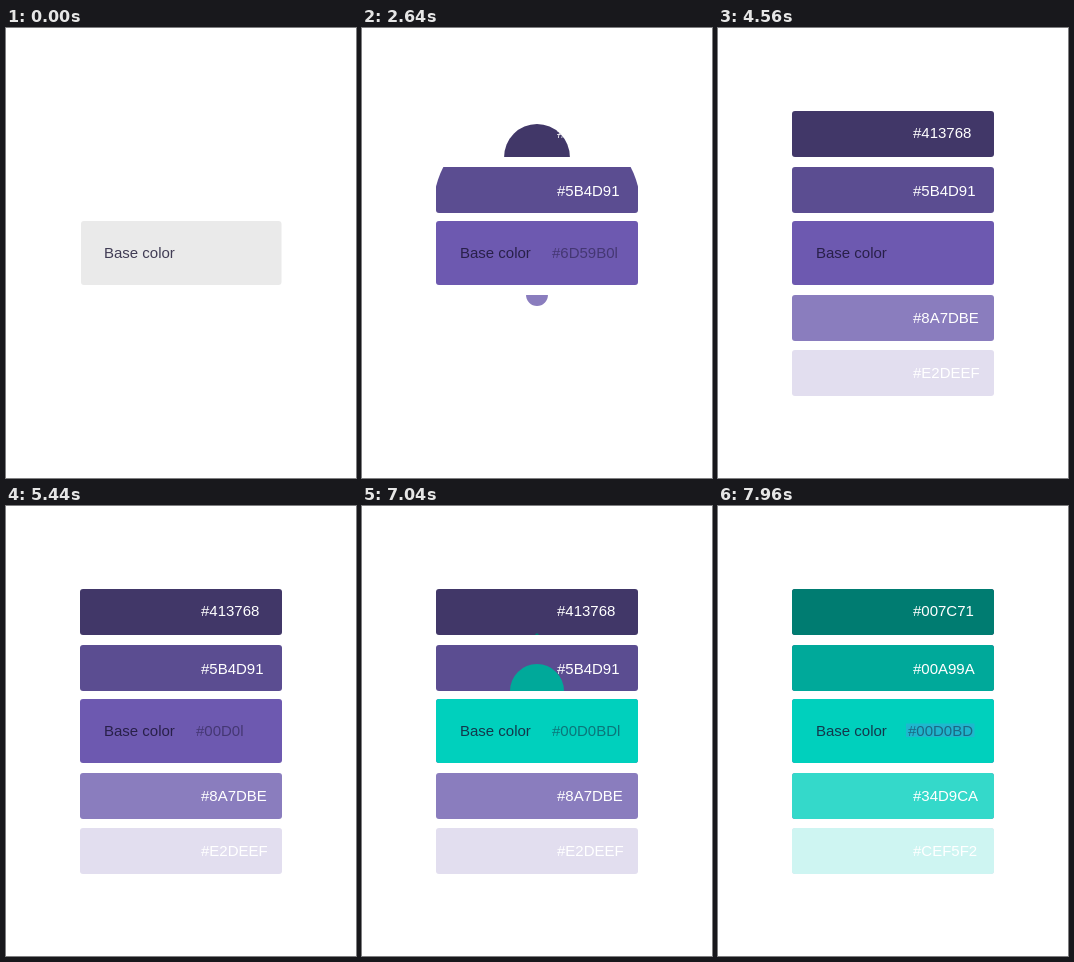
An HTML page that plays this animation: 350x450 px, repeating every 8 s.

```html
<!DOCTYPE html>
<html lang="en">
<head>
<meta charset="utf-8">
<title>Base color palette</title>
<style>
  html, body { margin: 0; width: 100%; height: 100%; overflow: hidden; background: #fff; }
  svg { display: block; width: 350px; height: 450px; }
  text { font: 15px "Liberation Sans", Arial, sans-serif; white-space: pre; }
</style>
</head>
<body>
<svg id="stage" viewBox="0 0 350 450"></svg>
<script>
const LOOP = 8000, STEP = 40, SECOND = 4640, CLEARED = 4080;
const GROW = 460, FULL = 112, KEY = 160, INK = '#181230';

// Each bar is revealed by a circle growing around (175, cy).
const BARS = [
  { y: 193, h: 64, cy: 225, start: 1814, colors: ['#6D59B0', '#00D0BD'] },
  { y: 139, h: 46, cy: 185, start: 2253, colors: ['#5B4D91', '#00A99A'], label: 167.5 },
  { y: 83, h: 46, cy: 129, start: 2475, colors: ['#413768', '#007C71'], label: 109.5, speck: true },
  { y: 267, h: 46, cy: 267, start: 2551, colors: ['#8A7DBE', '#34D9CA'], label: 294.5 },
  { y: 322, h: 46, cy: 322, start: 2647, colors: ['#E2DEEF', '#CEF5F2'], label: 349.5 }
];

const stage = document.getElementById('stage');

function add(parent, tag, attrs, text) {
  const node = document.createElementNS('http://www.w3.org/2000/svg', tag);
  for (const name in attrs) node.setAttribute(name, attrs[name]);
  if (text) node.textContent = text;
  return parent.appendChild(node);
}

add(stage, 'rect', { x: 75, y: 193, width: 200.5, height: 64, rx: 3, fill: '#eaeaea' });

const reveals = [];
[0, 1].forEach(set => BARS.forEach((bar, i) => {
  const id = `clip${set}${i}`;
  const clip = add(stage, 'clipPath', { id });
  const circle = add(clip, 'circle', { cx: 175, cy: bar.cy, r: 0 });
  const group = add(stage, 'g', { 'clip-path': `url(#${id})` });
  add(group, 'rect', { x: 74, y: bar.y, width: 202, height: bar.h, rx: 3, fill: bar.colors[set] });
  if (bar.label) add(group, 'text', { x: 195, y: bar.label, fill: '#fff' }, bar.colors[set]);
  reveals.push({ bar, set, circle, group });
}));

const selection = add(stage, 'rect', { x: 188, y: 217.5, width: 68.5, height: 13.5, fill: '#3f9fe0', opacity: 0.5 });
add(stage, 'text', { x: 98, y: 230, fill: INK, opacity: 0.8 }, 'Base color');
const field = add(stage, 'text', { x: 190, y: 230, fill: INK, opacity: 0.47 });

const clamp = (v, lo, hi) => Math.min(hi, Math.max(lo, v));
const ease = u => u * u * (3 - 2 * u);

function radius(bar, t) {
  const r = FULL * ease(clamp((t - bar.start) / GROW, 0, 1));
  const speck = bar.speck && t >= 1840 ? 0.5 + 1.5 * clamp((t - 1840) / 640, 0, 1) : 0;
  return Math.max(r, speck);
}

function caretOn(t) {
  if (t < 1120) return t < -80 || t >= 40;
  return t >= 1440 && (t - 1440) % 960 < 280;
}

function render(t) {
  for (const { bar, set, circle, group } of reveals) {
    const r = radius(bar, t - set * SECOND);
    circle.setAttribute('r', r);
    group.setAttribute('display', r > 0 ? 'inline' : 'none');
  }
  const round = t < CLEARED ? 0 : 1;
  const local = t - round * SECOND;
  const count = clamp(Math.floor(local / KEY), 0, 7);
  const selected = (t >= 3840 && t < CLEARED) || t >= 7960;
  field.textContent = BARS[0].colors[round].slice(0, count) + (caretOn(local) && !selected ? 'l' : '');
  selection.setAttribute('width', round ? 68.5 : 66);
  selection.setAttribute('display', selected ? 'inline' : 'none');
}

const begin = performance.now();
function tick() {
  const elapsed = (performance.now() - begin) % LOOP;
  render(Math.floor(elapsed / STEP) * STEP);
  requestAnimationFrame(tick);
}
tick();
</script>
</body>
</html>
```
